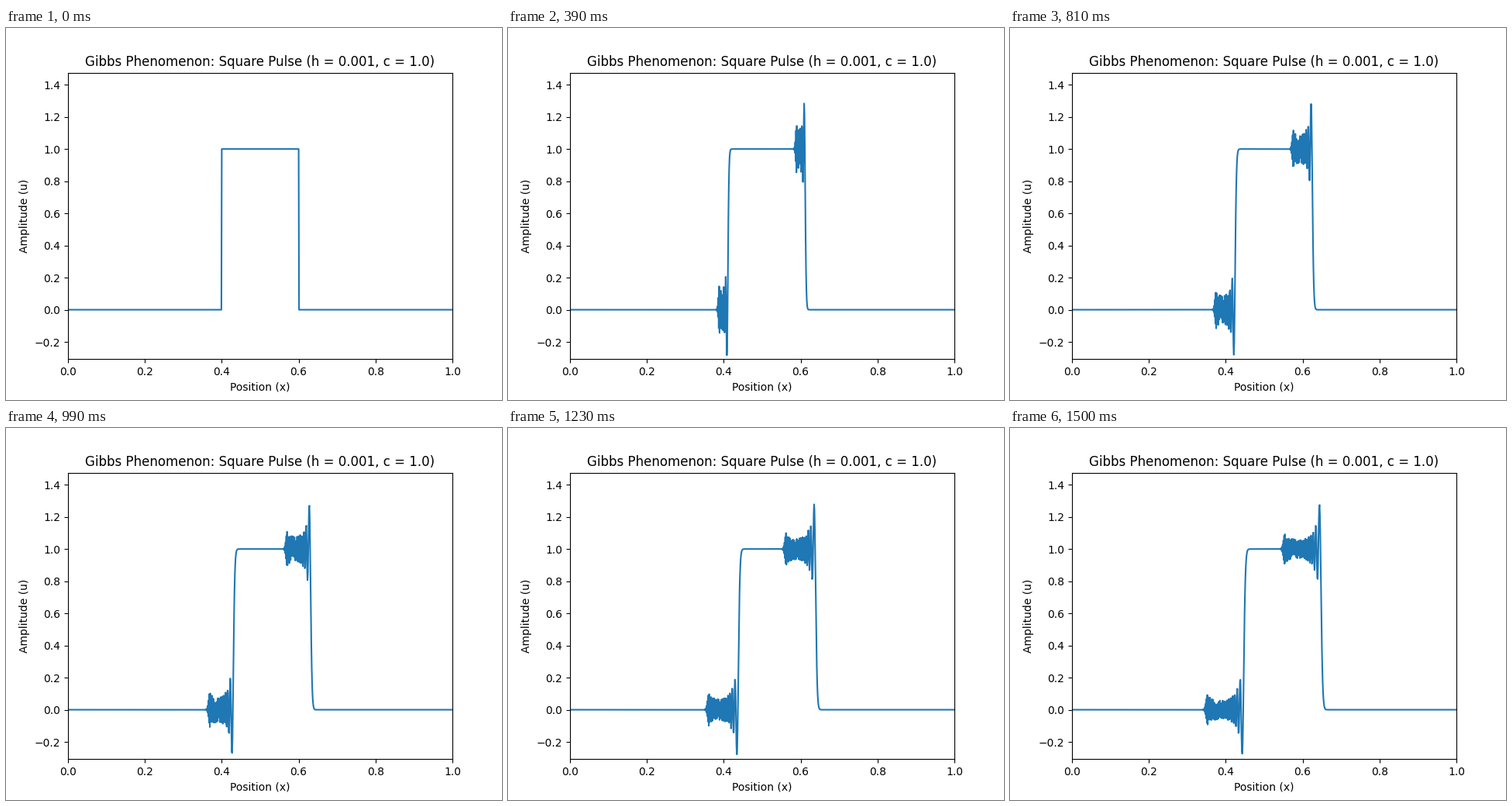
Animation of 640 by 480 pixels, one loop 1.53 s. Source, as a matplotlib script:

```python
import numpy as np
import matplotlib.pyplot as plt
from matplotlib.animation import FuncAnimation

H = 0.001          # grid spacing
C = 1.0            # wave speed
DT = 0.001         # time step, one per frame
FRAMES = 51
INTERVAL = 30


def slope(u):
    """Advection with central differences on a periodic grid."""
    return -C * (np.roll(u, -1) - np.roll(u, 1)) / (2 * H)


def rk4_step(u):
    k1 = slope(u)
    k2 = slope(u + DT / 2 * k1)
    k3 = slope(u + DT / 2 * k2)
    k4 = slope(u + DT * k3)
    return u + DT / 6 * (k1 + 2 * k2 + 2 * k3 + k4)


def solve():
    u = np.zeros(x.size)
    u[400:601] = 1.0
    states = [u]
    for _ in range(FRAMES - 1):
        states.append(rk4_step(states[-1]))
    return np.array(states)


x = np.linspace(0, 1, 1001)
states = solve()

plt.rcParams["font.family"] = "DejaVu Sans"
fig, ax = plt.subplots(figsize=(6.4, 4.8), dpi=100)
line, = ax.plot(x, states[0], color="#1f77b4", lw=1.5)
ax.set_xlim(0, 1)
ax.set_ylim(states.min() * 0.9, states.max() * 1.1)
ax.set_xlabel("Position (x)")
ax.set_ylabel("Amplitude (u)")
ax.set_title("Gibbs Phenomenon: Square Pulse (h = 0.001, c = 1.0)")


def update(frame):
    line.set_ydata(states[frame])
    return line,


anim = FuncAnimation(fig, update, frames=FRAMES, interval=INTERVAL,
                     repeat=True, repeat_delay=0, blit=False)
plt.show()
```
